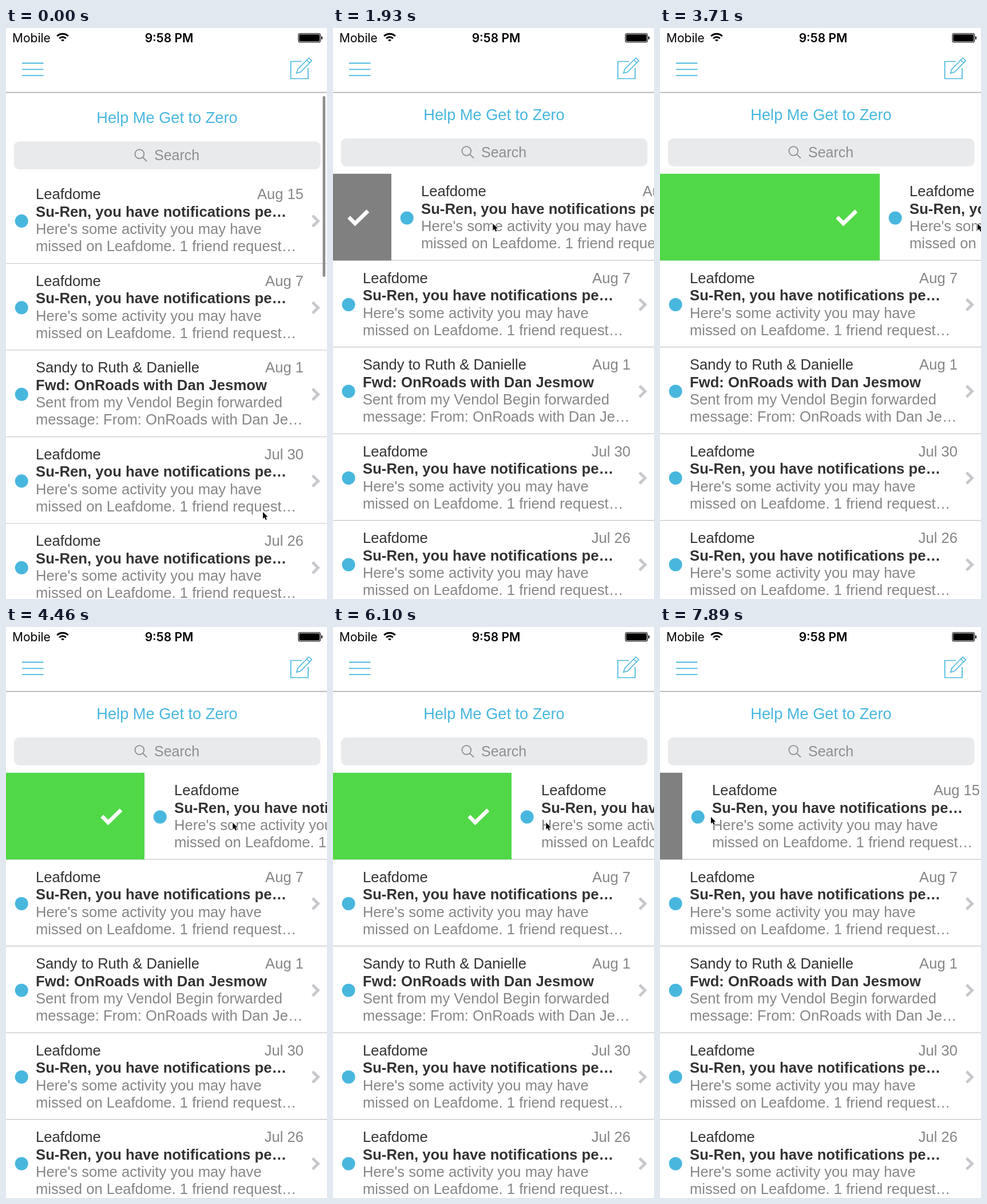
Recreate the animation shown at these times as an HTML page with a canvas. Size 561 px wide and 998 px high, loop 8000 ms.

```html
<!DOCTYPE html>
<html lang="en">
<head>
<meta charset="utf-8">
<title>Swipe inbox</title>
<style>
  html, body { margin: 0; width: 100%; height: 100%; overflow: hidden; background: #fff; }
  canvas { display: block; width: 561px; height: 998px; }
</style>
</head>
<body>
<canvas id="stage" width="561" height="998"></canvas>
<script>
const ctx = document.getElementById('stage').getContext('2d');
const W = 561, H = 998, LOOP = 8000, STEP = 148.4;
const LIST_TOP = 254.5, ROW = 151.5;
const BLUE = '#48b7de', DARK = '#333', GRAY = '#868686', ICON = '#8e8e93';
const SANS = '"Liberation Sans", Arial, sans-serif';
const UI = 'Inter, Roboto, sans-serif';

const notice = date => ({
  from: 'Leafdome', date,
  subject: 'Su-Ren, you have notifications pe…',
  body: ["Here's some activity you may have", 'missed on Leafdome. 1 friend request…']
});
const mails = [
  notice('Aug 15'),
  notice('Aug 7'),
  {
    from: 'Sandy to Ruth & Danielle', date: 'Aug 1',
    subject: 'Fwd: OnRoads with Dan Jesmow',
    body: ['Sent from my Vendol Begin forwarded', 'message: From: OnRoads with Dan Je…']
  },
  notice('Jul 30'),
  notice('Jul 26')
];

// Each drag pulls the first row to a new offset between two steps.
const drags = [
  { from: 8, to: 13, end: 102 },
  { from: 13, to: 15, end: 146 },
  { from: 19, to: 25, end: 384 },
  { from: 28, to: 32, end: 100 },
  { from: 33, to: 35, end: 0 },
  { from: 37, to: 41, end: 312 },
  { from: 41, to: 45, end: 478 },
  { from: 49, to: 53, end: 39 }
];

const mix = (a, b, p) => a + (b - a) * p;
const span = (t, a, b) => Math.min(1, Math.max(0, (t - a) / (b - a)));
const smooth = p => p * p * (3 - 2 * p);

const rowOffset = step =>
  drags.reduce((x, d) => mix(x, d.end, span(step, d.from, d.to)), 0);

// The pointer holds the row at a grip point and runs slightly ahead of it.
function pointer(step) {
  const x = rowOffset(step);
  const grip = mix(172, 50, span(step, 35, 37));
  const lead = (rowOffset(step + 1) - x) / 4;
  const arrive = smooth(span(step, 0, 8));
  return [
    mix(449, Math.min(555, x + grip + lead), arrive),
    mix(846, 342, arrive) - 10 * span(step, 49, 53)
  ];
}

function text(str, x, y, size, color, align = 'left', weight = 400, family = SANS) {
  ctx.font = `${weight} ${size}px ${family}`;
  ctx.fillStyle = color;
  ctx.textAlign = align;
  ctx.fillText(str, x, y);
}

function rect(x, y, w, h, color, r = 0) {
  ctx.fillStyle = color;
  ctx.beginPath();
  ctx.roundRect(x, y, w, h, r);
  ctx.fill();
}

function arc(x, y, r, from = 0, to = Math.PI * 2) {
  ctx.beginPath();
  ctx.arc(x, y, r, from, to);
}

function line(d, color, width) {
  ctx.strokeStyle = color;
  ctx.lineWidth = width;
  ctx.stroke(new Path2D(d));
}

function drawStatus() {
  text('Mobile', 11, 24.5, 21, '#000', 'left', 400, UI);
  text('9:58 PM', 285, 24.5, 21, '#000', 'center', 600, UI);
  ctx.strokeStyle = '#000';
  ctx.lineWidth = 3;
  for (const r of [2.5, 8.2, 13.8]) {
    arc(99, 24, r, -Math.PI * 0.75, -Math.PI * 0.25);
    ctx.stroke();
  }
  rect(510.5, 9, 39.5, 16.5, '#000', 3.5);
  rect(511.6, 10.1, 37.3, 14.3, '#fff', 2.6);
  rect(512.4, 10.9, 35.7, 12.7, '#000', 2);
  rect(551, 14.2, 2, 6, '#000', [0, 2, 2, 0]);
}

function drawHeader() {
  rect(0, 0, W, 113, '#fff');
  drawStatus();
  for (let i = 0; i < 3; i++) rect(28, 60.6 + i * 10.8, 37.5, 1.8, BLUE);
  line('M517 58.5H497.7V88.5H528V70', BLUE, 1.7);
  line('M507.8 79L510 72L529.3 52.3L534.3 57.3L514.8 77ZM525.7 56L530.7 61', BLUE, 1.6);
  rect(0, 111.8, W, 1.6, '#b0b0b0');
}

function drawSearch() {
  text('Help Me Get to Zero', 281.5, 160.7, 27.2, BLUE, 'center');
  rect(14, 193, 535.5, 48.7, '#e9eaec', 9);
  arc(233.3, 215, 7.9);
  ctx.strokeStyle = ICON;
  ctx.lineWidth = 1.8;
  ctx.stroke();
  line('M239 220.7L246 227.7', ICON, 1.9);
  text('Search', 259, 226, 25, ICON);
}

function drawMail(mail, x, y) {
  ctx.save();
  ctx.translate(x, y);
  arc(27.2, 77.5, 11.5);
  ctx.fillStyle = BLUE;
  ctx.fill();
  text(mail.from, 52, 39.5, 25.6, DARK);
  text(mail.date, 520, 39.5, 25.6, GRAY, 'right');
  text(mail.subject, 52, 70, 25.7, DARK, 'left', 700);
  mail.body.forEach((row, i) => text(row, 52, 100.5 + i * 30, 25.6, GRAY));
  line('M535.7 68L545.5 77.6L535.7 87.2', '#c7c7cc', 4.8);
  ctx.restore();
}

function drawAction(offset, y) {
  const remove = offset > W * 0.75;
  const done = offset > W * 0.25;
  ctx.save();
  ctx.beginPath();
  ctx.rect(0, y, offset, ROW + 0.5);
  ctx.clip();
  rect(0, y, offset, ROW + 0.5, remove ? '#ea3c02' : done ? '#50d847' : '#808080');
  ctx.translate(offset - 57, y + 76.5);
  if (remove) line('M-14.5 -14.5L14.5 14.5M14.5 -14.5L-14.5 14.5', '#fff', 7);
  else line('M-17.3 -0.3L-6.5 10.7L16 -11.3', '#fff', 6.8);
  ctx.restore();
}

function drawPointer(x, y) {
  ctx.save();
  ctx.translate(x, y);
  const arrow = 'M0 0V11.8L2.7 9.3L4.7 13.8L6.7 12.9L4.8 8.5H8.5Z';
  line(arrow, '#fff', 1.8);
  ctx.fillStyle = '#000';
  ctx.fill(new Path2D(arrow));
  ctx.restore();
}

function draw(time) {
  const step = Math.floor(time / STEP);
  const offset = rowOffset(step);

  rect(0, 0, W, H, '#fff');
  ctx.save();
  ctx.translate(0, 5.3 * 0.45 ** step);
  drawSearch();
  mails.forEach((mail, i) => {
    const y = LIST_TOP + i * ROW;
    rect(0, y + ROW - 0.4, W, 1.2, '#c4c4c6');
    if (i === 0) drawAction(offset, y);
    drawMail(mail, i === 0 ? offset : 0, y);
  });
  ctx.restore();

  drawHeader();
  ctx.globalAlpha = 1 - span(step, 2, 5);
  rect(553.5, 119, 4.6, 316, '#8e8e8e', 2.3);
  ctx.globalAlpha = 1;
  drawPointer(...pointer(step));
}

const start = performance.now();
function tick() {
  draw((performance.now() - start) % LOOP);
  requestAnimationFrame(tick);
}
tick();
</script>
</body>
</html>
```
